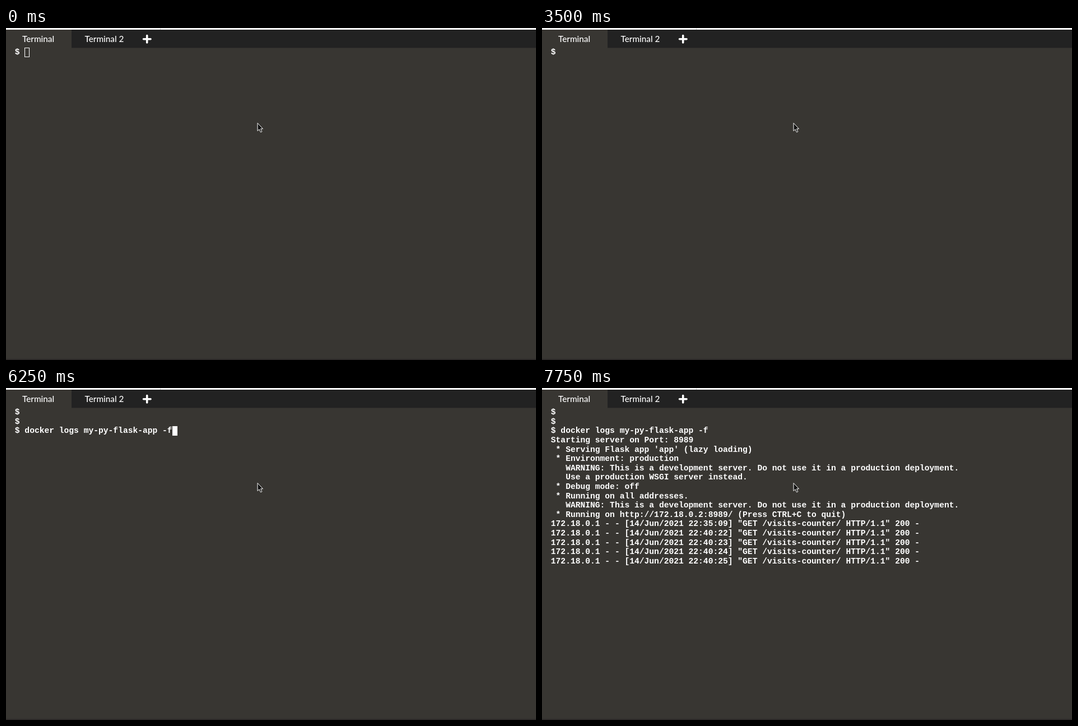
Recreate the animation shown at these times as an HTML page. Size 946x592 px, loop 8 s.

```html
<!DOCTYPE html>
<html lang="en">
<head>
<meta charset="utf-8">
<title>Terminal</title>
<style>
  html, body { margin: 0; height: 100%; overflow: hidden; background: #383632; }
  svg { display: block; width: 946px; height: 592px; }
  text { fill: #fff; white-space: pre; }
  .tab { font: 500 15.3px Lato, "Noto Sans", sans-serif; }
  #rows { font: bold 14.633px "Liberation Mono", "Courier New", monospace; }
</style>
</head>
<body>
<svg viewBox="0 0 946 592">
  <rect width="946" height="592" fill="#383632"/>
  <rect y="590" width="946" height="2" fill="#2d2a29"/>
  <rect width="946" height="3" fill="#fff"/>
  <rect x="275" width="1" height="3" fill="#ccc"/>
  <rect y="3" width="946" height="32.5" fill="#222"/>
  <rect y="3" width="117" height="33" fill="#383632"/>
  <text class="tab" x="29" y="25">Terminal</text>
  <text class="tab" x="140.5" y="24.5">Terminal 2</text>
  <path d="M245.5 19.7h12.5M251.7 13.5v12.5" stroke="#fff" stroke-width="3.6" stroke-linecap="round"/>
  <g id="rows"></g>
  <rect id="cursor" stroke="#fff"/>
  <path d="M449 169.5v14l3.1-2.8 2.3 5.1 2.4-1-2.2-5h4z" fill="#111" stroke="#fff"/>
</svg>
<script>
const LOOP = 8000, X = 15.8, Y = 35.1, COL = 8.78, ROW = 16.6;
const rows = document.getElementById('rows');
const cursor = document.getElementById('cursor');

const command = '$\n$\n$ docker logs my-py-flask-app -f';
const warning = '   WARNING: This is a development server. Do not use it in a production deployment.';
const hits = ['35:09', '40:22', '40:23', '40:24', '40:25'].map(
  t => `172.18.0.1 - - [14/Jun/2021 22:${t}] "GET /visits-counter/ HTTP/1.1" 200 -`);
const logs = [
  command,
  'Starting server on Port: 8989',
  " * Serving Flask app 'app' (lazy loading)",
  ' * Environment: production',
  warning,
  '   Use a production WSGI server instead.',
  ' * Debug mode: off',
  ' * Running on all addresses.',
  warning,
  ' * Running on http://172.18.0.2:8989/ (Press CTRL+C to quit)',
  ...hits, ''
].join('\n');

// [start time, screen text]; the cursor follows the last character
const screens = [
  [0, '$ '], [4500, '$\n$\n$ '], [5000, '$\n$\n$ clear'],
  [5750, '$\n$\n$ cl'], [6250, command], [7250, logs]
];
// [start time, cursor fill]; null hides the cursor
const on = '#fff', off = null;
const blinks = [
  [0, 'none'], [500, on], [1250, off], [1750, on], [2250, off], [3000, on],
  [3500, off], [4250, on], [6750, off], [7000, on], [7750, off]
];
const at = (steps, t) => steps.filter(s => s[0] <= t).pop()[1];

let shown;
function show(screen) {
  if (screen === shown) return;
  shown = screen;
  const lines = screen.split('\n');
  rows.replaceChildren(...lines.map((line, i) => {
    const text = document.createElementNS('http://www.w3.org/2000/svg', 'text');
    text.setAttribute('x', X);
    text.setAttribute('y', Y + i * ROW + 12);
    text.textContent = line;
    return text;
  }));
  const last = lines.length - 1;
  const box = {
    x: Math.round(X + lines[last].length * COL) + 0.5,
    y: Math.round(Y + last * ROW) + 0.5,
    width: last > 2 ? 7 : 8,
    height: 16
  };
  for (const key in box) cursor.setAttribute(key, box[key]);
}

function frame(now) {
  const t = now % LOOP, fill = at(blinks, t);
  show(at(screens, t));
  cursor.setAttribute('visibility', fill ? 'visible' : 'hidden');
  cursor.setAttribute('fill', fill || 'none');
  requestAnimationFrame(frame);
}
frame(performance.now());
</script>
</body>
</html>
```
